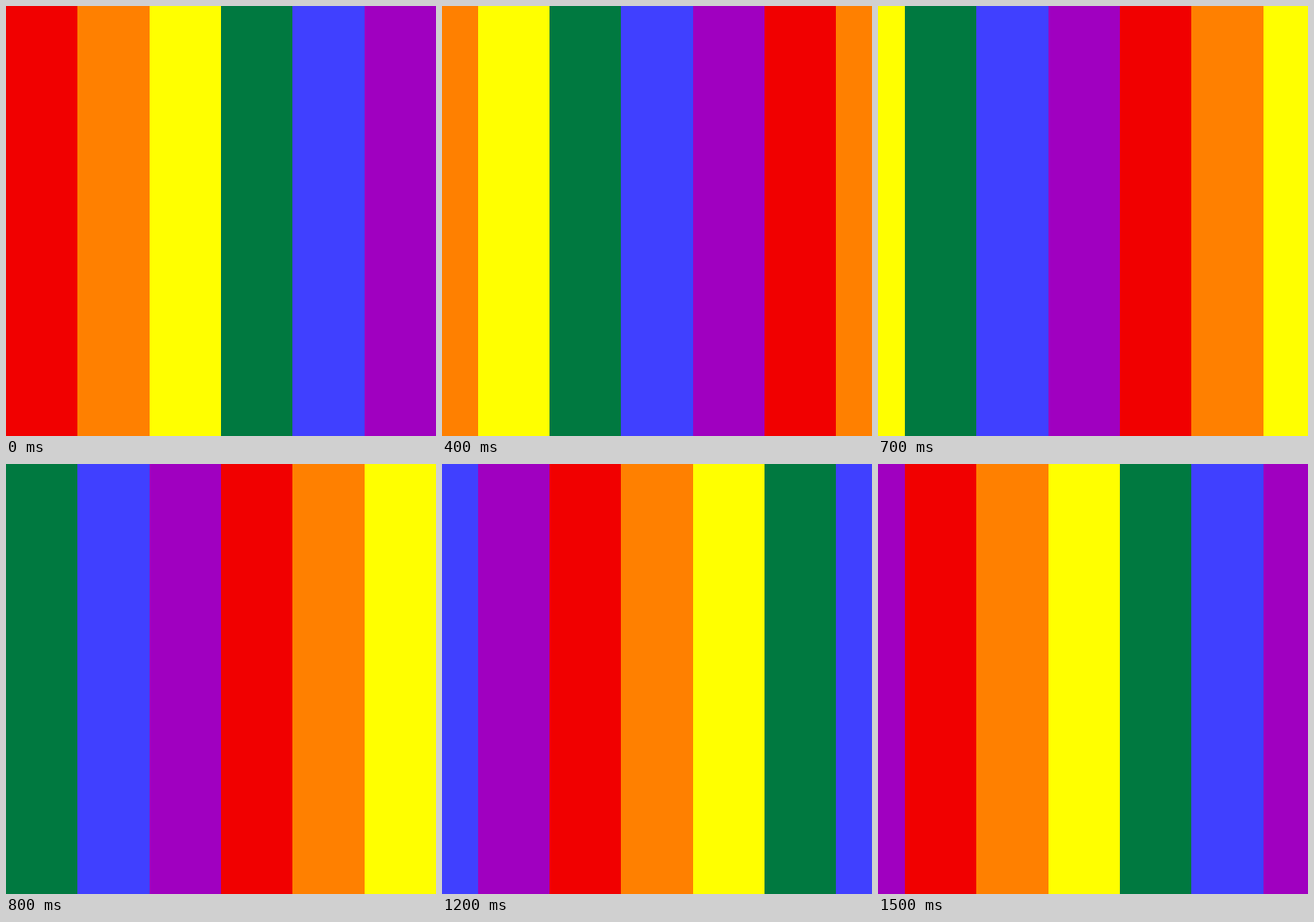
Recreate the animation shown at these times as an HTML page with a canvas. Size 512 px wide and 512 px high, loop 1600 ms.

```html
<!DOCTYPE html>
<html lang="en">
<head>
<meta charset="utf-8">
<title>Scrolling rainbow stripes</title>
<style>
  html, body { margin: 0; height: 100%; overflow: hidden; }
  canvas { display: block; }
</style>
</head>
<body>
<canvas id="stage" width="512" height="512"></canvas>
<script>
const SIZE = 512, LOOP = 1600, STEP = 100;
const COLORS = ['#f10000', '#ff8000', '#ffff00', '#007940', '#4040ff', '#a000c0'];
const ctx = document.getElementById('stage').getContext('2d');

function draw(time) {
  // The stripes jump left in equal steps, one full stage width per loop.
  const shift = Math.floor((time % LOOP) / STEP) * SIZE * STEP / LOOP;
  const edge = i => Math.round(i * SIZE / COLORS.length - shift);
  for (let i = 0; i < COLORS.length * 2; i++) {
    ctx.fillStyle = COLORS[i % COLORS.length];
    ctx.fillRect(edge(i), 0, edge(i + 1) - edge(i), SIZE);
  }
}

const start = performance.now();
function tick() {
  draw(performance.now() - start);
  requestAnimationFrame(tick);
}
tick();
</script>
</body>
</html>
```
